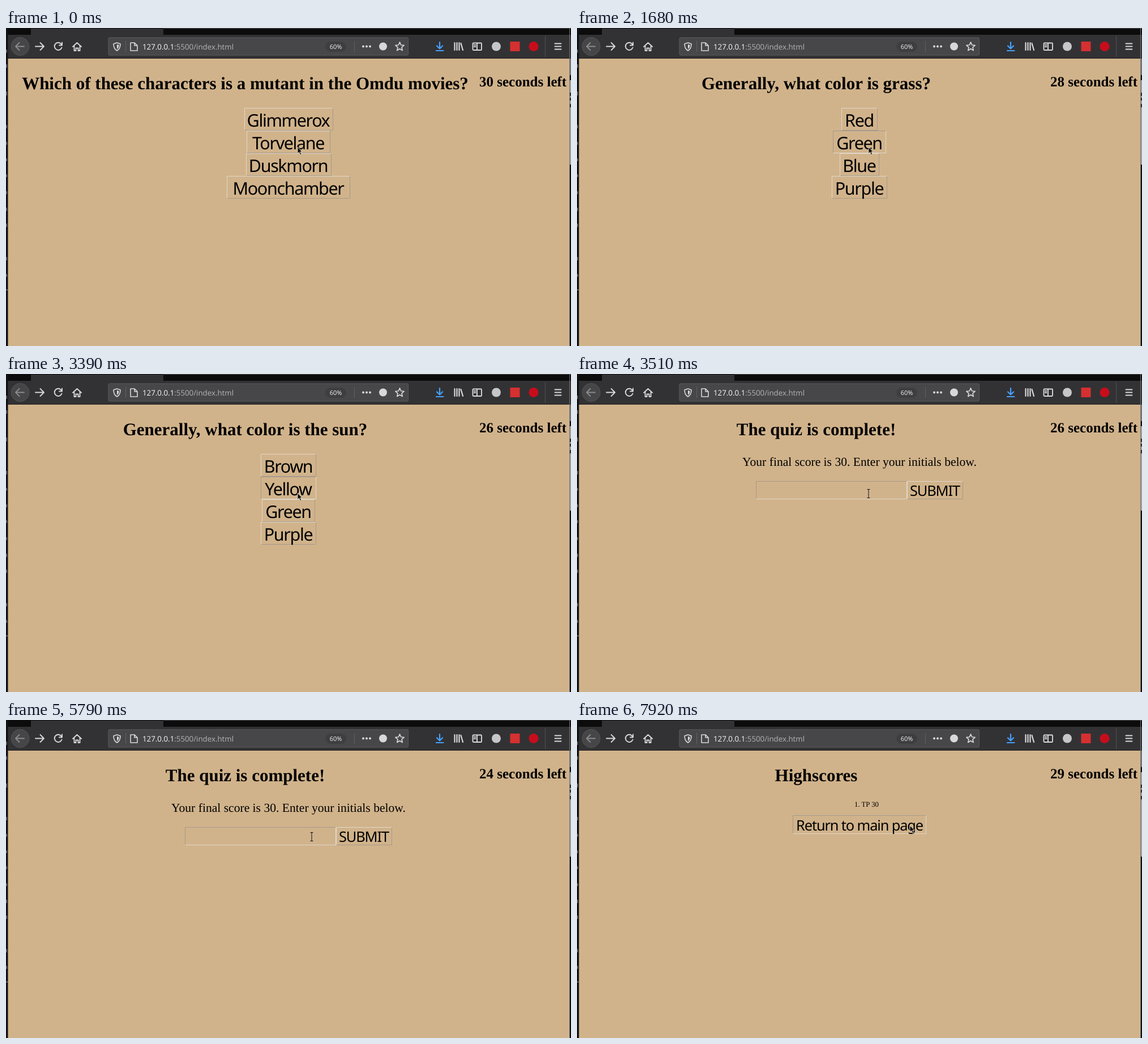
Write an HTML page that moves like this. It is 998 by 561 pixels and loops after 8000 ms.

```html
<!DOCTYPE html>
<html lang="en">
<head>
<meta charset="utf-8">
<title>Quiz</title>
<style>
html, body { margin: 0; width: 100%; height: 100%; overflow: hidden; background: #d1b38b; }
svg { display: block; width: 998px; height: 561px; }
text { text-rendering: geometricPrecision; }
.head, .timer { font: bold 31px "Liberation Serif", serif; }
.timer { font-size: 25px; }
.para { font: 21.6px "Liberation Serif", serif; }
.score { font: 12.8px "Liberation Serif", serif; }
.option, .small { font: 30.5px "Noto Sans", sans-serif; letter-spacing: -.045em; }
.small { font-size: 25.4px; }
.mid { text-anchor: middle; }
.url { font: 13.3px "Open Sans", sans-serif; fill: #b4b4b6; }
.zoom { font: 11px "Open Sans", sans-serif; fill: #f2f2f3; }
.icon { fill: none; stroke: #d8d8da; stroke-width: 1.9; stroke-linecap: round; stroke-linejoin: round; }
</style>
</head>
<body>
<svg viewBox="0 0 998 561">
  <rect width="998" height="561" fill="#d1b38b"/>

  <!-- browser window -->
  <rect width="998" height="12" fill="#0c0c0d"/>
  <path d="M278 .5H998" stroke="#4b4b4d"/>
  <rect x="44" y="1" width="234" height="12" fill="#323234"/>
  <rect y="12" width="998" height="42" fill="#323234"/>
  <path d="M0 53.5H995" stroke="#202022"/>
  <rect width="3.5" height="561" fill="#111216"/>
  <path d="M1 38v6M1 64v6M1 112v7M1 171v6M1 201v5M1 230v5M1 258v5M1 288v5M1 317v6M1 345v6M1 404v6M1 434v5M0 462h3" stroke="#777a80" stroke-width="1.4"/>
  <rect x="995" y="54" width="3" height="507" fill="#0d0e13"/>
  <rect x="996" y="54" width="2" height="29" fill="#77777a"/>
  <rect x="996" y="92" width="2" height="149" fill="#a2a2a4"/>
  <path d="M997 114v6M997 123v5M997 134v6" stroke="#333" stroke-width="2"/>
  <path d="M995.5 0V561" stroke="#77736c"/>

  <!-- navigation -->
  <circle cx="25" cy="32.5" r="16" fill="#464649" stroke="#545457"/>
  <path class="icon" d="M32 32.5H17.5M23.5 26L17 32.5L23.5 39" style="stroke:#8b8b8e"/>
  <path class="icon" d="M52 32.5H66.5M60.5 26L67 32.5L60.5 39"/>
  <path class="icon" d="M98 29A6.6 6.6 0 1 0 98.5 34.5M99 25.5V30.5H94"/>
  <path class="icon" d="M118 33L125.5 26L133 33M120.5 32V40H123.5V35.5H127.5V40H130.5V32"/>

  <!-- address bar -->
  <rect x="181" y="17" width="529.5" height="31" rx="2" fill="#474749" stroke="#5c5c5f"/>
  <path class="icon" d="M196 26L202 28C202 34 200.5 37.5 196 40C191.5 37.5 190 34 190 28Z" style="stroke-width:1.6"/>
  <path d="M196 29L199.5 30C199.3 33.5 198.5 35.5 196 37Z" fill="#d8d8da"/>
  <path d="M211.5 23V42M615.5 23V42" stroke="#606064"/>
  <path class="icon" d="M220 26H227L232 31V40H220ZM227 26V31H232" style="stroke-width:1.6"/>
  <text class="url" x="241" y="38"><tspan fill="#f9f9fa">127.0.0.1</tspan>:5500/index.html</text>
  <rect x="564" y="24" width="37" height="18" rx="9" fill="#3e3e42"/>
  <text class="zoom mid" x="582.5" y="37">60%</text>
  <g fill="#d8d8da">
    <circle cx="631" cy="32.5" r="2"/><circle cx="637" cy="32.5" r="2"/><circle cx="643" cy="32.5" r="2"/>
    <circle cx="666" cy="32.5" r="7"/>
  </g>
  <path class="icon" id="star" style="stroke-width:1.7"/>

  <!-- toolbar buttons -->
  <path class="icon" d="M766 25V36M761 31.5L766 36.5L771 31.5M760 40H772.5" style="stroke:#45a1ff;stroke-width:2.2"/>
  <path class="icon" d="M792.5 26V39M796.5 26V39M800.5 26V39M803.5 27L807 39" style="stroke-width:2.2"/>
  <path class="icon" d="M826 26.5H839Q840 26.5 840 28V37.5Q840 39 839 39H826Q824.5 39 824.5 37.5V28Q824.5 26.5 826 26.5ZM832 27V39M827 30H829.5M827 33H829.5"/>
  <circle cx="866" cy="32.5" r="8" fill="#c6c6c8"/>
  <rect x="890.5" y="24" width="17" height="17" fill="#d63031"/>
  <circle cx="932" cy="32.5" r="8.5" fill="#c70d1c"/>
  <path d="M952.5 14V51" stroke="#515154"/>
  <path class="icon" d="M969.5 27.5H980.5M969.5 32.5H980.5M969.5 37.5H980.5"/>

  <g id="page"></g>
  <path id="arrow" d="M0 0V11.5L2.7 9L4.6 13.6L6.7 12.7L4.8 8.3H8Z" fill="#060606" stroke="#e8dcc8" stroke-width=".9"/>
  <path id="beam" d="M-2.5 -7.5H2.5M0 -7.5V7.5M-2.5 7.5H2.5" stroke="#111" fill="none"/>
</svg>

<script>
const LOOP = 8000;
const CENTER = 499;
const LIGHT = '#e0d8ca', DARK = '#a49a8c';
const $ = id => document.getElementById(id);

const starPoints = Array.from({ length: 10 }, (_, i) => {
  const a = i * Math.PI / 5 - Math.PI / 2, r = i % 2 ? 3.7 : 8;
  return [695.5 + r * Math.cos(a), 33 + r * Math.sin(a)].map(v => v.toFixed(1));
});
$('star').setAttribute('d', `M${starPoints.join('L')}Z`);

const label = (cls, x, y, str) => `<text class="${cls}" x="${x}" y="${y}">${str}</text>`;

function bevel(x, y, w, h, inset) {
  const [first, second] = inset ? [DARK, LIGHT] : [LIGHT, DARK];
  return `<g fill="none"><path d="M${x} ${y + h}V${y}H${x + w}" stroke="${first}"/>
    <path d="M${x + w} ${y}V${y + h}H${x}" stroke="${second}"/></g>`;
}

// Each question lists its options as [text, box width].
const questions = {
  film: ['Which of these characters is a mutant in the Omdu movies?',
    [['Glimmerox', 156], ['Torvelane', 147], ['Duskmorn', 150], ['Moonchamber', 217]]],
  grass: ['Generally, what color is grass?',
    [['Red', 63], ['Green', 93], ['Blue', 69], ['Purple', 97]]],
  sun: ['Generally, what color is the sun?',
    [['Brown', 97], ['Yellow', 97], ['Green', 93], ['Purple', 97]]]
};

const heading = str => label('head mid', 422.5, 108, str);

function question([title, options], pressed) {
  return heading(title) + options.map(([str, w], i) => {
    const y = 141.5 + 40 * i;
    return bevel(Math.floor(CENTER - w / 2) + .5, y, w, 39, pressed && i === 1) +
      label('option mid', CENTER - .5, y + 32.5, str);
  }).join('');
}

function complete({ typed, caret, pressed }) {
  return heading('The quiz is complete!') +
    label('para mid', CENTER, 161.5, 'Your final score is 30. Enter your initials below.') +
    bevel(316.5, 189.5, 266, 31, true) +
    bevel(583.5, 189.5, 98, 31, pressed) +
    label('small mid', 449.5, 215, typed) +
    label('small mid', 632, 215, 'SUBMIT') +
    (caret ? `<path d="M${caret} 191V219" stroke="#000"/>` : '');
}

function scores({ typed, pressed }) {
  return heading('Highscores') +
    label('score mid', 511.5, 153, `1. ${typed} 30`) +
    bevel(381.5, 168.5, 235, 32, pressed) +
    label('small mid', CENTER, 194.5, 'Return to main page');
}

const screens = { complete, scores };

// Every step changes only the listed parts of the state.
const steps = [
  [0, { screen: 'film', left: 30, arrow: [515, 210], beam: null, pressed: false, typed: '', caret: 0 }],
  [380, { left: 29, pressed: true }],
  [630, { screen: 'grass', pressed: false }],
  [1430, { left: 28 }],
  [1680, { pressed: true }],
  [1960, { screen: 'sun', pressed: false }],
  [2330, { left: 27 }],
  [3390, { left: 26, pressed: true }],
  [3510, { screen: 'complete', pressed: false, arrow: null, beam: [515, 211] }],
  [4010, { beam: [527, 211] }],
  [4130, { beam: [552, 212] }],
  [4250, { beam: [579, 214] }],
  [4400, { left: 25, beam: null, arrow: [604, 223] }],
  [5060, { arrow: [592, 220] }],
  [5180, { arrow: null, beam: [558, 210] }],
  [5300, { beam: [540, 206], caret: 449.5 }],
  [5420, { left: 24 }],
  [5790, { caret: 0 }],
  [6160, { typed: 'TP', caret: 464 }],
  [6410, { left: 23, caret: 0 }],
  [6660, { beam: [562, 208] }],
  [6780, { beam: null, arrow: [614, 212] }],
  [6900, { arrow: [646, 216] }],
  [7020, { pressed: true }],
  [7140, { screen: 'scores', pressed: false }],
  [7260, { left: 29 }],
  [7650, { arrow: [628, 206] }],
  [7780, { arrow: [601, 192] }],
  [7920, { arrow: [588, 186], pressed: true }]
];

let state = {};
const states = steps.map(([, change]) => state = { ...state, ...change });

function place(id, at) {
  $(id).style.display = at ? '' : 'none';
  if (at) $(id).setAttribute('transform', `translate(${at})`);
}

function render(s) {
  const body = questions[s.screen]
    ? question(questions[s.screen], s.pressed)
    : screens[s.screen](s);
  $('page').innerHTML = body + label('timer', 836, 103, `${s.left} seconds left`);
  place('arrow', s.arrow);
  place('beam', s.beam);
}

let shown = -1;
const start = performance.now();
function frame() {
  const t = (performance.now() - start) % LOOP;
  const current = steps.findLastIndex(([at]) => at <= t);
  if (current !== shown) render(states[shown = current]);
  requestAnimationFrame(frame);
}
frame();
</script>
</body>
</html>
```
